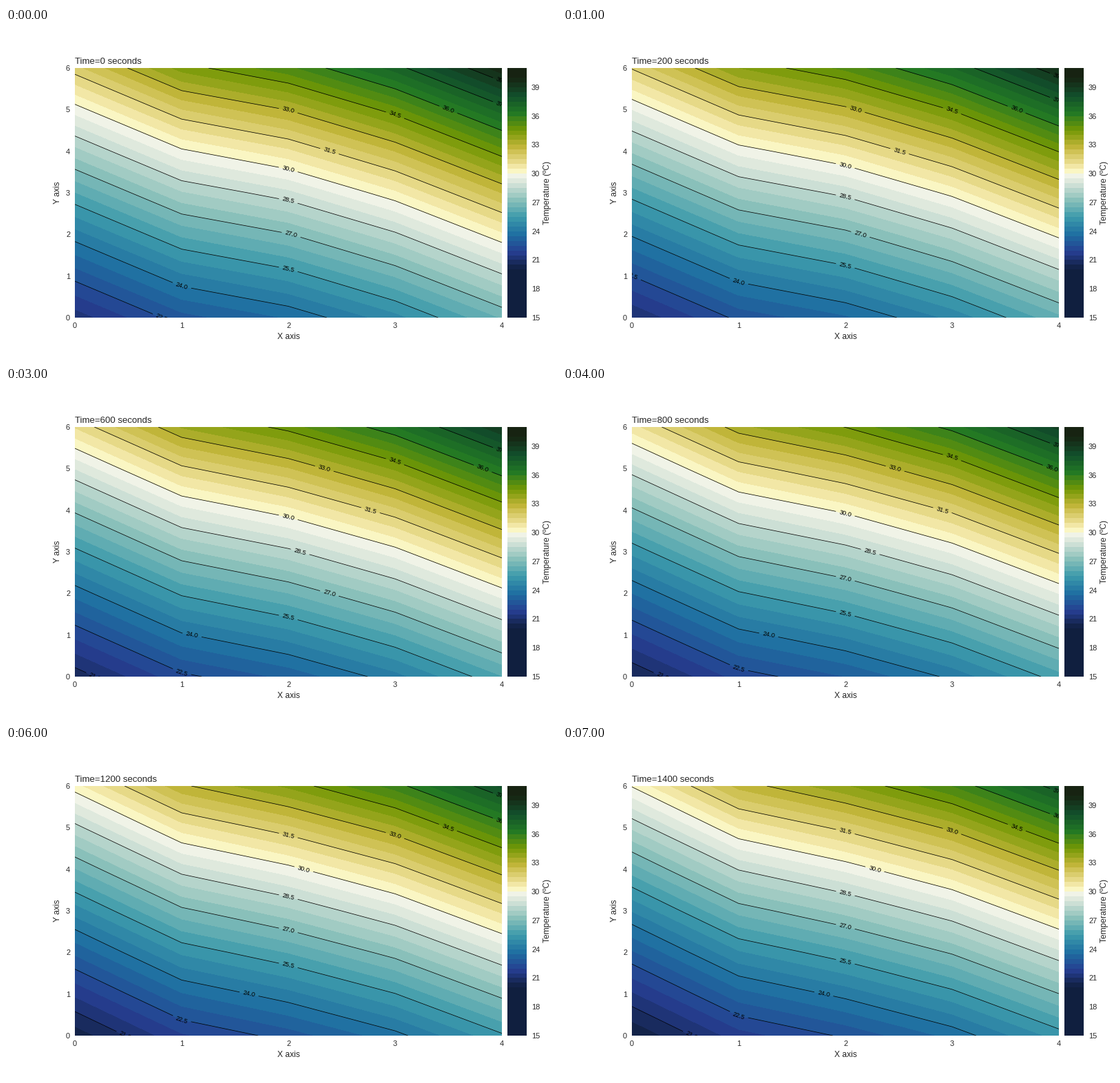
A matplotlib script that plays this animation: 800 px wide and 480 px high, repeating every 8 s.

```python
import numpy as np
import matplotlib.pyplot as plt
from matplotlib.animation import FuncAnimation
from matplotlib.colors import LinearSegmentedColormap

W, H, DPI = 800, 480, 100
FRAMES, STEP = 8, 200
INK = "#262626"


def px(size):
    """Pixels to points."""
    return size * 72 / DPI


plt.rcParams.update({
    "font.family": "Liberation Sans",
    "text.color": INK,
    "xtick.color": INK,
    "ytick.color": INK,
})

# Diverging map: navy to white, then pale yellow to dark green
COLD = ["#101f3f", "#263e90", "#1e6ea1", "#3c9aab", "#8cc1ba", "#d9e5da"]
WARM = ["#efe29c", "#c3b63b", "#739805", "#227824", "#124e2b", "#172312"]
stops = [(i / 11, color) for i, color in enumerate(COLD + WARM)]
stops += [(.499, "#f9f9ec"), (.5, "#fffed4")]
cmap = LinearSegmentedColormap.from_list("warmth", sorted(stops))

BANDS = np.arange(15, 41.1, .5)
LINES = np.arange(15, 41, 1.5)

# Each column starts at its own temperature, cools at its own rate
# and is 7 % warmer with every row upwards.
START = np.array([21.2, 22.8, 23.55, 24.8, 26.54])
COOLING = np.array([.0082, .0066, .0059, .0068, .0073])
xs, ys = np.arange(5), np.arange(7)


def field(k):
    return np.outer(1.07 ** ys, START * np.exp(-COOLING * k))


def add_axes(left, top, right, bottom):
    return fig.add_axes([left / W, 1 - bottom / H,
                         (right - left) / W, (bottom - top) / H])


def hide_frame(axes):
    axes.tick_params(length=0, pad=px(7), labelsize=px(11))
    for spine in axes.spines.values():
        spine.set_visible(False)


def label(x, y, text, rotation=0):
    fig.text(x / W, 1 - y / H, text, fontsize=px(12), ha="center",
             va="baseline", rotation=rotation, rotation_mode="anchor")


fig = plt.figure(figsize=(W / DPI, H / DPI), dpi=DPI, facecolor="white")
ax = add_axes(100, 58, 720, 420)
cax = add_axes(728, 58, 756, 420)


def draw(k):
    ax.clear()
    temp = field(k)
    filled = ax.contourf(xs, ys, temp, levels=BANDS, cmap=cmap,
                         vmin=20, vmax=40)
    lines = ax.contour(xs, ys, temp, levels=LINES, colors="black",
                       linewidths=px(.75))
    ax.clabel(lines, fmt="%.1f", fontsize=px(9.3), colors="black")
    ax.set_xticks(xs)
    ax.set_yticks(ys)
    hide_frame(ax)
    ax.set_title(f"Time={k * STEP} seconds", loc="left", fontsize=px(13.2),
                 pad=px(6.5))
    return filled


bar = fig.colorbar(draw(0), cax=cax, ticks=np.arange(15, 40, 3))
bar.outline.set_visible(False)
bar.ax.minorticks_off()
hide_frame(cax)
label(410, 451, "X axis")
label(78, 239, "Y axis", 90)
label(789, 239, "Temperature (ºC)", 90)


def update(k):
    draw(k)
    return []


anim = FuncAnimation(fig, update, frames=FRAMES, init_func=lambda: [],
                     interval=1000, repeat=True, repeat_delay=0)
plt.show()
```
